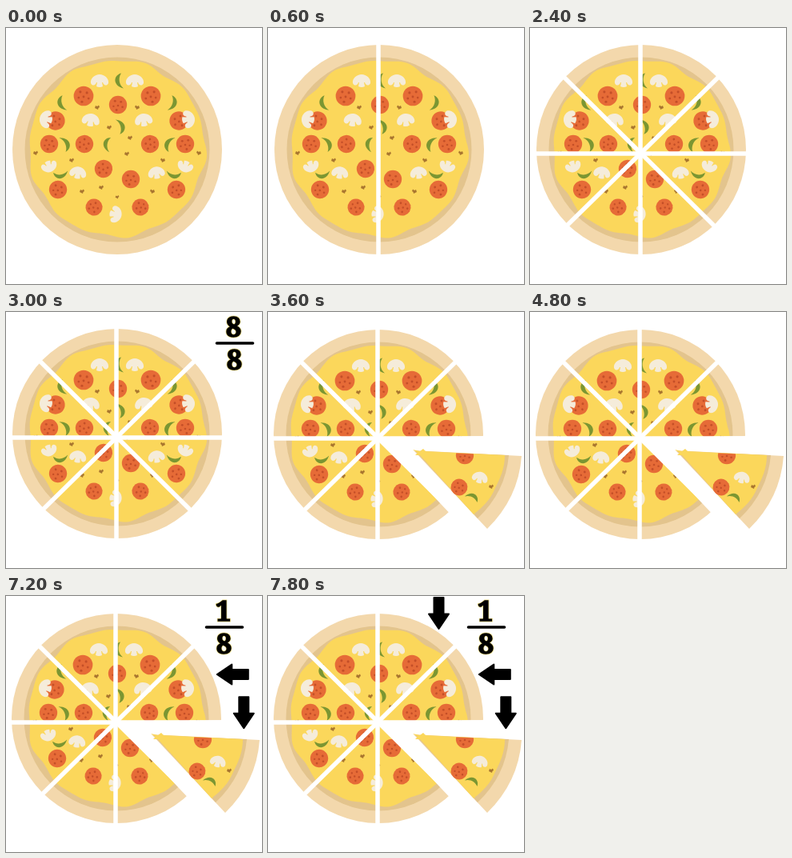
An HTML page for the animation above (8 s loop, 320x320 px).

```html
<!DOCTYPE html>
<html lang="en">
<head>
<meta charset="utf-8">
<title>Pizza fractions</title>
<style>
html, body { margin: 0; width: 100%; height: 100%; overflow: hidden; background: #fff; }
svg { display: block; width: 100vw; height: 100vh; }
text { font: 900 34px "Noto Serif", "Liberation Serif", serif; text-anchor: middle; }
.glow { fill: #eedf8a; stroke: #eedf8a; stroke-width: 3; }
.ink { fill: #000; stroke: #000; stroke-width: 1.5; }
</style>
</head>
<body>
<svg id="stage" viewBox="0 0 320 320">
  <defs>
    <g id="pepperoni">
      <circle r="12" fill="#e66b37"/>
      <g fill="#c44f28">
        <circle cx="-4" cy="-5" r="1.5"/><circle cx="4" cy="-4" r="1.5"/>
        <circle cx="-6" cy="2" r="1.3"/><circle cx="0" cy="1" r="1.4"/>
        <circle cx="6" cy="3" r="1.4"/><circle cx="-2" cy="7" r="1.5"/>
      </g>
    </g>
    <path id="mushroom" fill="#f5ecda" d="M-11 3C-12-3-6-8 0-8S12-3 11 3C9 7 5 6 4 2L3 2 4 7Q0 9-4 7L-3 2-4 2C-5 6-9 7-11 3Z"/>
    <path id="pepper" fill="#7b9632" d="M3-9.5C-7-7-8 6 6 9.5C0 5-1-4 3-9.5Z"/>
    <path id="crumb" fill="#a9762f" d="M-3 1L-2-2 0-1 2-2.5 3 0 1.5 1 1 3-1 2Z"/>
    <path id="arrow" stroke="#000" stroke-width="2" stroke-linejoin="round" d="M-6-19.5H6V1H12.5L0 19.5-12.5 1H-6Z"/>
  </defs>
  <g id="pizza">
    <circle cx="139" cy="152" r="131" fill="#f3d8ac"/>
    <circle cx="139" cy="152" r="115.5" fill="#e3c48d"/>
    <path id="cheese" fill="#fbd75b"/>
    <g id="toppings"></g>
    <g stroke="#fff" stroke-width="5.5">
      <path id="cut0" d="M138 18V286"/>
      <path id="cut1" d="M5 157H273"/>
      <path id="cut2" d="M41 60L232 249"/>
      <path id="cut3" d="M237 60L44 249"/>
    </g>
  </g>
  <g id="served">
    <path fill="#fff" d="M138 157L275 155V275L249 275Z"/>
    <path fill="#f3d8ac" d="M182 173L317 180Q313 233 274 271Z"/>
    <path fill="#e3c48d" d="M184 174L301 179Q297 225 262 258Z"/>
    <path fill="#fbd75b" d="M181 172L190 174 194 171 197 174 296 179C296 196 290 208 284 220C278 235 268 244 257 253L190 179 184 179 187 176Z"/>
    <clipPath id="slice"><path d="M182 174L317 180 274 271Z"/></clipPath>
    <g id="sliceToppings" clip-path="url(#slice)"></g>
  </g>
  <g id="whole"></g>
  <g id="eighth"></g>
  <use id="arrow0" href="#arrow" x="297.3" y="145.7"/>
  <use id="arrow1" href="#arrow" transform="translate(283.3 98) rotate(90)"/>
  <use id="arrow2" href="#arrow" x="213.5" y="21.5"/>
</svg>
<script>
const $ = id => document.getElementById(id);

const place = (kind, x, y, turn = 0, size = 1) =>
  `<use href="#${kind}" transform="translate(${x} ${y}) rotate(${turn}) scale(${size})"/>`;
const placeAll = (kind, spots) => spots.map(s => place(kind, ...s)).join('');

const half =
  placeAll('pepperoni', [[97, 85, 0, 1.03], [62, 116, 20, .97], [54, 145, 0, .93],
    [98, 145, 40, .93], [65, 202, 10, .93], [110, 224, 60, .88]]) +
  placeAll('mushroom', [[117, 66], [50, 114, -80], [106, 115, 8], [54, 173, 160, .9], [90, 181, 10, .95]]) +
  placeAll('pepper', [[69, 94, -8], [75, 145, 165], [68, 184, -88, .95]]) +
  placeAll('crumb', [[114, 99], [82, 165], [37, 156], [95, 204]]);
const centre =
  placeAll('pepperoni', [[140, 96, 0, .93], [122, 176, 30, .93], [156, 189, 0, .93]]) +
  place('mushroom', 137, 233, 100, .95) +
  placeAll('pepper', [[141, 66], [144, 123, 172], [126, 145, 15, .95]]) +
  placeAll('crumb', [[129, 124], [155, 137], [151, 157], [119, 199], [139, 211, 0, .8]]);
$('toppings').innerHTML =
  `<g id="half">${half}</g><use href="#half" transform="translate(278) scale(-1 1)"/>${centre}`;

$('sliceToppings').innerHTML =
  placeAll('pepperoni', [[246, 179, 0, .93], [239, 219, 20, .87]]) +
  place('mushroom', 265, 207, 15, .9) +
  place('pepper', 256, 231, 125, .9) +
  place('crumb', 279, 218);

// Wavy cheese edge
const edge = Array.from({ length: 180 }, (_, i) => {
  const a = i * Math.PI / 90;
  const r = 110 + 1.4 * Math.sin(9 * a + 1) + 1.2 * Math.sin(14 * a);
  return `${(139 + r * Math.cos(a)).toFixed(1)} ${(150.5 + r * Math.sin(a)).toFixed(1)}`;
});
$('cheese').setAttribute('d', `M${edge.join('L')}Z`);

const digit = (d, x, y) => ['glow', 'ink']
  .map(c => `<text class="${c}" x="${x}" y="${y}">${d}</text>`).join('');
const fraction = (top, bottom, x) => digit(top, x - 1, 30.5) + digit(bottom, x, 71.5) +
  `<path d="M${x - 22} 39H${x + 23}" stroke="#000" stroke-width="3.6" stroke-linecap="round"/>`;
$('whole').innerHTML = fraction(8, 8, 285.5);
$('eighth').innerHTML = fraction(1, 8, 272.5);

// Visible from / until, in ms
const LOOP = 8000;
const cues = {
  cut0: [600], cut1: [1200], cut2: [1800], cut3: [2400],
  whole: [3000, 3600], served: [3600], eighth: [5400],
  arrow0: [6000], arrow1: [7200], arrow2: [7800]
};

function draw(now) {
  const t = now % LOOP;
  for (const [id, [from, until = LOOP]] of Object.entries(cues))
    $(id).style.display = t >= from && t < until ? '' : 'none';
  $('pizza').setAttribute('transform', t >= 3600 ? 'translate(-1 1)' : '');
}

const start = performance.now();
function tick() {
  draw(performance.now() - start);
  requestAnimationFrame(tick);
}
tick();
</script>
</body>
</html>
```
